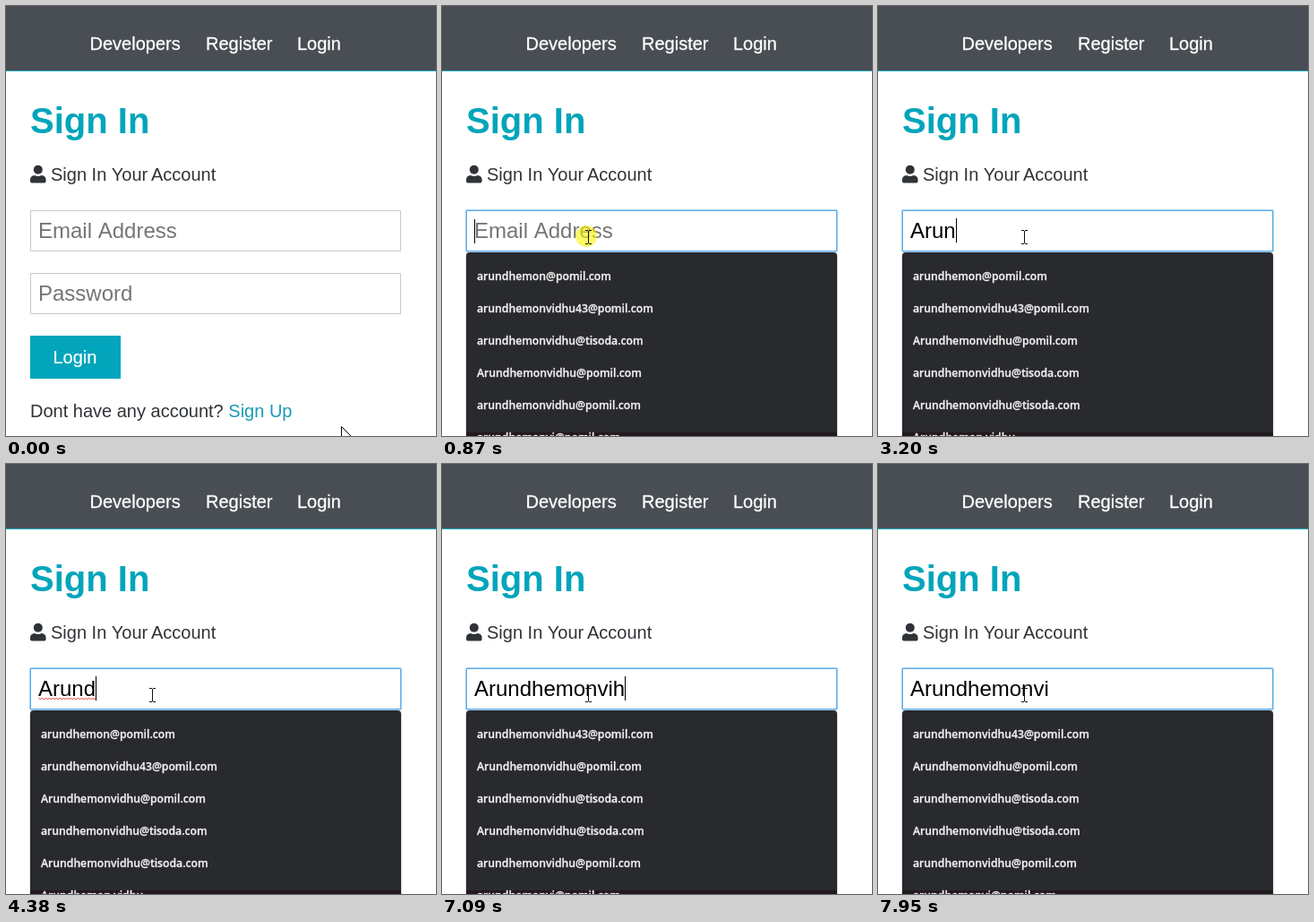
An HTML page with a canvas that plays this animation: 480x480 px, repeating every 8 s.

```html
<!DOCTYPE html>
<html lang="en">
<head>
<meta charset="utf-8">
<title>Sign In</title>
<style>
  html, body { margin: 0; width: 100%; height: 100%; overflow: hidden; background: #fff; }
  canvas { display: block; width: 480px; height: 480px; }
</style>
</head>
<body>
<canvas id="stage" width="480" height="480"></canvas>
<script>
const ctx = document.getElementById('stage').getContext('2d');
const LOOP = 8000;
const SANS = '"Liberation Sans", Arial, sans-serif';
const MENU_FONT = '600 12.2px "Open Sans", "Noto Sans", sans-serif';
const TEAL = '#02a5bb', DARK = '#2f3337';

const TYPED = 'Arundhemonvihd';
const USER = 'arundhemonvidhu', CAP_USER = 'Arundhemonvidhu';
const MAIL = '@pomil.com', CLOUD = '@tisoda.com';

const LISTS = {
  recent: ['arundhemon' + MAIL, USER + '43' + MAIL, USER + CLOUD,
           CAP_USER + MAIL, USER + MAIL, 'arundhemonvi' + MAIL],
  first: ['arundhemon' + MAIL, USER + '43' + MAIL, CAP_USER + MAIL,
          USER + CLOUD, CAP_USER + CLOUD, 'Arundhemon vidhu'],
  narrowed: [USER + '43' + MAIL, CAP_USER + MAIL, USER + CLOUD,
             CAP_USER + CLOUD, USER + MAIL, 'arundhemonvi' + MAIL]
};

// Each step changes only the listed parts of the state.
const STEPS = [
  [0, { chars: 0, caret: false, focus: false, list: '', squiggle: false }],
  [870, { focus: true, caret: true, list: 'recent' }],
  [1340, { caret: false }],
  [1880, { chars: 1, caret: true, list: 'first' }],
  [2420, { caret: false }],
  [2670, { chars: 2, caret: true }],
  [3050, { chars: 3 }],
  [3200, { chars: 4 }],
  [3280, { chars: 5 }],
  [3830, { caret: false }],
  [4290, { squiggle: true }],
  [4380, { caret: true }],
  [4930, { caret: false }],
  [4990, { caret: true }],
  [5160, { chars: 6, squiggle: false }],
  [5220, { chars: 7 }],
  [5390, { chars: 8 }],
  [5530, { chars: 9 }],
  [5620, { chars: 10 }],
  [6170, { caret: false }],
  [6470, { chars: 11, caret: true, list: 'narrowed' }],
  [6700, { chars: 12 }],
  [7090, { chars: 13 }],
  [7180, { list: '' }],
  [7240, { chars: 14 }],
  [7710, { chars: 13, caret: false }],
  [7950, { chars: 12, list: 'narrowed' }]
];

function stateAt(t) {
  const state = {};
  for (const [start, change] of STEPS) if (t >= start) Object.assign(state, change);
  return state;
}

function rect(x, y, w, h, color) {
  ctx.fillStyle = color;
  ctx.fillRect(x, y, w, h);
}

// A little extra weight thickens light text on dark ground.
function text(str, x, y, color, font, weight = 0) {
  ctx.font = font;
  ctx.fillStyle = color;
  ctx.fillText(str, x, y);
  if (!weight) return;
  ctx.strokeStyle = color;
  ctx.lineWidth = weight;
  ctx.lineJoin = 'round';
  ctx.strokeText(str, x, y);
}

const label = (str, x, y, color, size = 20, weight = 0) =>
  text(str, x, y, color, `${size}px ${SANS}`, weight);

function field(y, focus) {
  ctx.lineWidth = 1;
  if (focus) {
    ctx.strokeStyle = 'rgba(95, 173, 234, 0.6)';
    ctx.beginPath();
    ctx.roundRect(26.5, y - 0.5, 415, 47, 1.5);
    ctx.stroke();
  }
  ctx.strokeStyle = focus ? '#5fadea' : '#c8c8c8';
  ctx.strokeRect(27.5, y + 0.5, 413, 45);
}

function userIcon() {
  ctx.fillStyle = DARK;
  ctx.beginPath();
  ctx.arc(35.8, 182.8, 5, 0, Math.PI * 2);
  ctx.fill();
  ctx.beginPath();
  ctx.moveTo(32, 189);
  ctx.quadraticCurveTo(35.8, 190.8, 39.6, 189);
  ctx.quadraticCurveTo(44.6, 189.3, 44.6, 194.3);
  ctx.lineTo(44.6, 195.5);
  ctx.quadraticCurveTo(44.6, 197.4, 42.7, 197.4);
  ctx.lineTo(28.9, 197.4);
  ctx.quadraticCurveTo(27, 197.4, 27, 195.5);
  ctx.lineTo(27, 194.3);
  ctx.quadraticCurveTo(27, 189.3, 32, 189);
  ctx.fill();
}

function page() {
  rect(0, 0, 480, 480, '#fff');
  rect(0, 0, 480, 72, '#484e53');
  rect(0, 72, 480, 1, '#2ab0c4');
  label('Developers', 93.5, 49, '#fff', 20, 0.3);
  label('Register', 223, 49, '#fff', 20, 0.3);
  label('Login', 325, 49, '#fff', 20, 0.3);
  text('Sign In', 27, 142, TEAL, `bold 40px ${SANS}`);
  userIcon();
  label('Sign In Your', 50, 195, DARK);
  label('Account', 162, 195, DARK);
  field(298, false);
  label('Password', 36, 329, '#757575', 24);
  rect(27, 368, 101, 48, TEAL);
  label('Login', 52.5, 399, '#fff', 20, 0.2);
  label('Dont have any account?', 27, 459, DARK);
  label('Sign Up', 248.3, 459, '#179ab8');
}

function emailField(s) {
  field(228, s.focus);
  const value = TYPED.slice(0, s.chars);
  if (value) label(value, 36, 259, '#000', 24);
  else label('Email Address', 36, 259, '#757575', 24);
  ctx.font = `24px ${SANS}`;
  const width = ctx.measureText(value).width;
  if (s.squiggle) {
    ctx.strokeStyle = '#e03030';
    ctx.lineWidth = 1;
    ctx.beginPath();
    for (let x = 0; x <= width; x += 2) ctx.lineTo(36.5 + x, x % 4 ? 263 : 261);
    ctx.stroke();
  }
  if (s.caret) rect(Math.round(36 + width), value ? 237 : 238, 1, 27, '#000');
}

function menu(rows) {
  ctx.fillStyle = 'rgba(0, 0, 0, 0.1)';
  ctx.beginPath();
  ctx.roundRect(26, 275, 416, 220, 4);
  ctx.fill();
  ctx.fillStyle = '#292a2e';
  ctx.beginPath();
  ctx.roundRect(27, 275, 414, 220, 4);
  ctx.fill();
  rect(27, 476, 414, 4, '#21191f');
  rows.forEach((row, i) => text(row, 39, 305.5 + 36 * i, '#f1f1f1', MENU_FONT, 0.3));
}

function glow(t) {
  let alpha = 0;
  if ((t >= 780 && t < 950) || (t >= 4990 && t < 5160)) alpha = 0.6;
  else if ((t >= 950 && t < 1020) || (t >= 5160 && t < 5220)) alpha = 0.25;
  if (!alpha) return;
  ctx.fillStyle = `rgba(248, 242, 0, ${alpha})`;
  ctx.beginPath();
  ctx.arc(161, 257, 12, 0, Math.PI * 2);
  ctx.fill();
}

// The pointer rises past the field, then settles on it.
function pointerAt(t) {
  const tick = t < 70 ? 0 : Math.floor((t - 70) / 79) + 1;
  const ease = k => k * k * (3 - 2 * k);
  const rise = ease(Math.min(1, tick / 6));
  const settle = ease(Math.max(0, Math.min(1, (tick - 6) / 3)));
  return {
    x: Math.round(374 - 205 * rise - 6 * settle),
    y: Math.round(469 - 247 * rise + 36 * settle)
  };
}

function arrow(x, y) {
  const outline = [[0, 0], [0, 17], [4, 13], [7, 19], [9.5, 18], [7, 12], [12, 12]];
  ctx.beginPath();
  for (const [dx, dy] of outline) ctx.lineTo(x + 0.5 + dx, y + 0.5 + dy);
  ctx.closePath();
  ctx.fillStyle = '#fff';
  ctx.fill();
  ctx.strokeStyle = '#000';
  ctx.lineWidth = 1;
  ctx.stroke();
}

function beam(x, y) {
  rect(x, y - 7, 1, 14, '#111');
  for (const edge of [y - 8, y + 7]) {
    rect(x - 3, edge, 3, 1, '#111');
    rect(x + 1, edge, 3, 1, '#111');
  }
}

function pointer(t) {
  const { x, y } = pointerAt(t);
  const inField = x > 27 && x < 441 && ((y > 228 && y < 274) || (y > 298 && y < 344));
  (inField ? beam : arrow)(x, y);
}

function draw(t) {
  const s = stateAt(t);
  page();
  emailField(s);
  if (s.list) menu(LISTS[s.list]);
  glow(t);
  pointer(t);
}

const begin = performance.now();
function frame() {
  draw((performance.now() - begin) % LOOP);
  requestAnimationFrame(frame);
}
frame();
</script>
</body>
</html>
```
